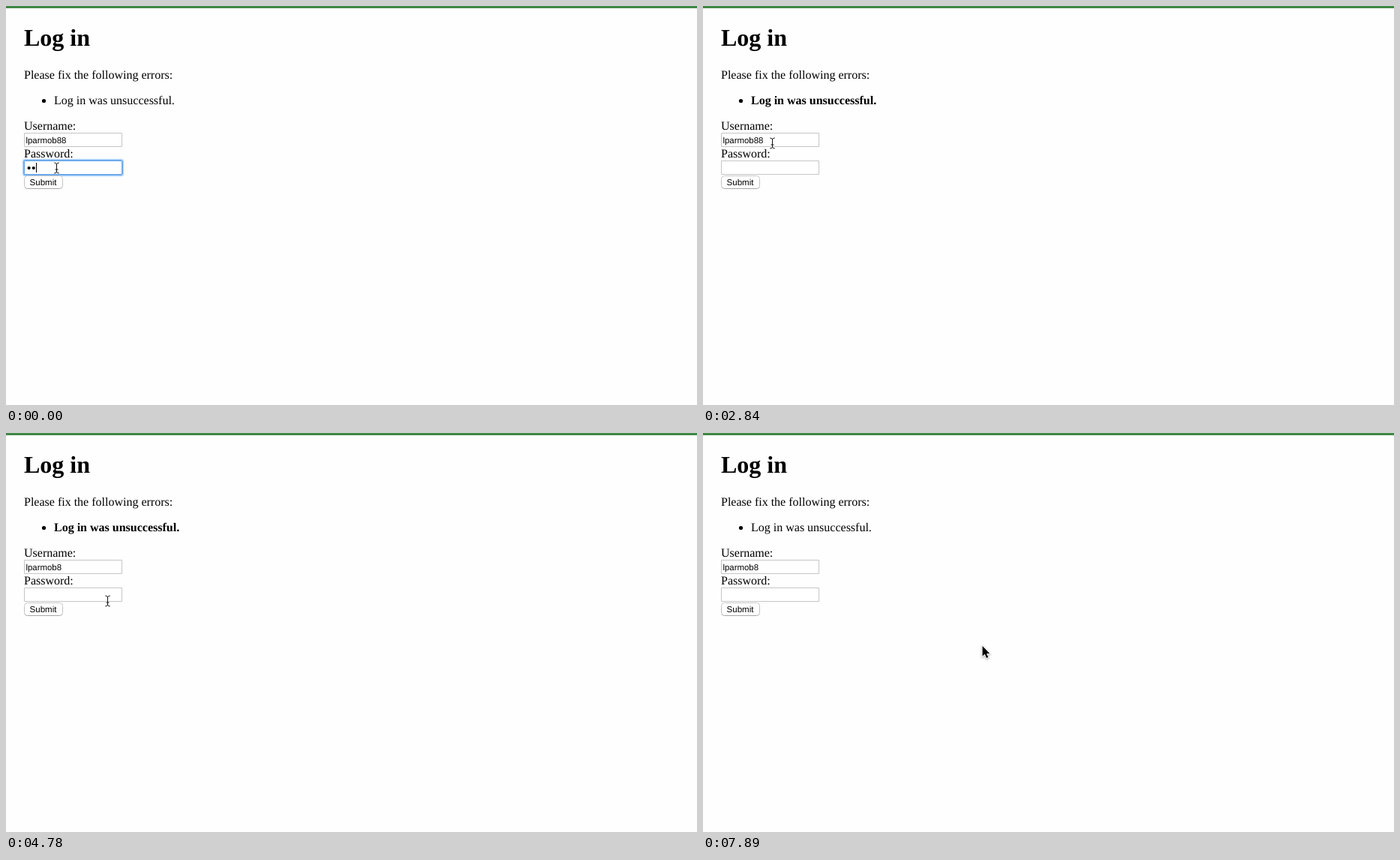
Write an HTML page with a canvas that moves like this. It is 921 px wide and 532 px high and loops after 8000 ms.

```html
<!DOCTYPE html>
<html lang="en">
<head>
<meta charset="utf-8">
<title>Log in</title>
<style>
  html, body { margin: 0; width: 100%; height: 100%; overflow: hidden; background: #fefefe; }
  canvas { display: block; }
</style>
</head>
<body>
<canvas id="stage" width="921" height="532"></canvas>
<script>
const ctx = document.getElementById('stage').getContext('2d');
const LOOP = 8000;
const SERIF = '"Liberation Serif", "Times New Roman", serif';
const SANS = '"Liberation Sans", Arial, sans-serif';
const USER = 'lparmob88';
const FIELD = { x: 24, w: 131, h: 19, user: 169, pass: 206 };

// Each step changes part of the state at its time.
const steps = [
  [0, { dots: 2, user: USER, focus: 'pass', caret: true, bold: false, popup: false, cursor: 'beam', x: 67.5, y: 216 }],
  [140, { dots: 3 }],
  ...typing(440, 150, 4),
  [1640, { caret: false }],
  [1790, { dots: 0, focus: '', bold: true }],
  [2540, { x: 78.5, y: 195 }],
  [2690, { x: 91.5, y: 160 }],
  [2840, { x: 92.5, y: 183 }],
  [2990, { focus: 'user', caret: true }],
  [3280, { user: USER.slice(0, -1) }],
  [3430, { popup: true }],
  [3730, { cursor: 'arrow', x: 176, y: 205 }],
  [3880, { x: 206, y: 212 }],
  [4030, { x: 216, y: 212 }],
  [4180, { popup: false, focus: '' }],
  [4330, { x: 143, y: 227 }],
  [4630, { x: 138, y: 226 }],
  [4780, { cursor: 'beam', x: 135.5, y: 224 }],
  [4930, { focus: 'pass', y: 221 }],
  [5380, { caret: false }],
  [5530, { caret: true, dots: 1 }],
  [5670, { dots: 2 }],
  [5820, { dots: 3 }],
  ...typing(6120, 145, 4),
  [7300, { dots: 0, focus: '', bold: false }],
  [7890, { cursor: 'arrow', x: 372.5, y: 284 }]
];

function typing(start, gap, first) {
  return Array.from({ length: 5 }, (_, i) => [start + i * gap, { dots: first + i }]);
}

function stateAt(t) {
  return Object.assign({}, ...steps.filter(s => s[0] <= t).map(s => s[1]));
}

function text(str, x, y, font, color = '#000') {
  ctx.font = font;
  ctx.fillStyle = color;
  ctx.fillText(str, x, y);
}

function dot(x, y, r) {
  ctx.fillStyle = '#000';
  ctx.beginPath();
  ctx.arc(x, y, r, 0, Math.PI * 2);
  ctx.fill();
}

function box(x, y, w, h, r) {
  ctx.beginPath();
  ctx.roundRect(x, y, w, h, r);
}

function field(y, focused) {
  const { x, w, h } = FIELD;
  ctx.fillStyle = '#fff';
  ctx.fillRect(x, y, w, h);
  ctx.lineWidth = 1;
  const rings = focused
    ? [[2.5, '#eef6fe'], [1.5, '#b9d8f9'], [0.5, '#74aff0'], [-0.5, '#66a5e8']]
    : [[-0.5, '#c6c6c6']];
  for (const [d, color] of rings) {
    ctx.strokeStyle = color;
    box(x - d, y - d, w + 2 * d, h + 2 * d, Math.max(0, d + 0.5));
    ctx.stroke();
  }
}

function caret(x, y) {
  ctx.fillStyle = '#000';
  ctx.fillRect(Math.floor(x), y + 3, 1, 13);
}

function button() {
  ctx.lineWidth = 1;
  box(24.5, 226.5, 51, 17, 4);
  ctx.fillStyle = '#fff';
  ctx.fill();
  const edge = ctx.createLinearGradient(0, 226, 0, 244);
  edge.addColorStop(0, '#c9c9c9');
  edge.addColorStop(0.8, '#c0c0c0');
  edge.addColorStop(1, '#a2a2a2');
  ctx.strokeStyle = edge;
  ctx.stroke();
  text('Submit', 31.6, 239, `11.5px ${SANS}`);
}

function popup() {
  ctx.save();
  ctx.shadowColor = 'rgba(0,0,0,0.4)';
  ctx.shadowBlur = 3;
  ctx.shadowOffsetY = 1;
  ctx.fillStyle = '#fff';
  box(24, 190, 131.5, 51, [0, 0, 3, 3]);
  ctx.fill();
  ctx.restore();
  text(USER, 36, 220, `13.5px ${SANS}`, '#1c1c1c');
}

function beam(x, y) {
  ctx.save();
  ctx.translate(x, y);
  ctx.lineCap = 'round';
  ctx.beginPath();
  ctx.moveTo(-2.8, -7);
  ctx.quadraticCurveTo(-0.2, -7, 0, -5);
  ctx.quadraticCurveTo(0.2, -7, 2.8, -7);
  ctx.moveTo(0, -5);
  ctx.lineTo(0, 5);
  ctx.moveTo(-2.8, 7);
  ctx.quadraticCurveTo(-0.2, 7, 0, 5);
  ctx.quadraticCurveTo(0.2, 7, 2.8, 7);
  ctx.moveTo(-1.6, 2);
  ctx.lineTo(1.6, 2);
  for (const [w, color] of [[2.2, 'rgba(255,255,255,0.7)'], [1, '#111']]) {
    ctx.lineWidth = w;
    ctx.strokeStyle = color;
    ctx.stroke();
  }
  ctx.restore();
}

function arrow(x, y) {
  const shape = new Path2D('M0 0V13.6L3.1 10.7L5.4 16L7.7 15L5.4 9.9H9.6Z');
  ctx.save();
  ctx.translate(x, y);
  ctx.shadowColor = 'rgba(0,0,0,0.4)';
  ctx.shadowBlur = 2.5;
  ctx.shadowOffsetY = 1;
  ctx.lineWidth = 1.8;
  ctx.strokeStyle = '#fff';
  ctx.stroke(shape);
  ctx.shadowColor = 'transparent';
  ctx.fillStyle = '#000';
  ctx.fill(shape);
  ctx.restore();
}

function draw(s) {
  ctx.textRendering = 'geometricPrecision';
  ctx.fillStyle = '#fefefe';
  ctx.fillRect(0, 0, 921, 532);
  ctx.fillStyle = '#3f8845';
  ctx.fillRect(0, 0, 921, 3);

  text('Log in', 24, 53, `bold 32px ${SERIF}`);
  text('Please fix the following errors:', 24, 97, `16px ${SERIF}`);
  dot(50.5, 126.5, 2.6);
  text('Log in was unsuccessful.', 64, 131, `${s.bold ? 'bold ' : ''}16px ${SERIF}`);
  text('Username:', 24, 165, `16px ${SERIF}`);
  text('Password:', 24, 202, `16px ${SERIF}`);

  field(FIELD.user, s.focus === 'user');
  field(FIELD.pass, s.focus === 'pass');
  button();

  text(s.user, 26.5, 183, `11.4px ${SANS}`);
  const userEnd = 26.5 + ctx.measureText(s.user).width;
  for (let i = 0; i < s.dots; i++) dot(30.6 + i * 6.15, 216, 2.1);
  if (s.caret && s.focus === 'user') caret(userEnd, FIELD.user);
  if (s.caret && s.focus === 'pass') caret(28 + s.dots * 6.15, FIELD.pass);

  if (s.popup) popup();
  (s.cursor === 'beam' ? beam : arrow)(s.x, s.y);
}

const start = performance.now();
function tick() {
  draw(stateAt((performance.now() - start) % LOOP));
  requestAnimationFrame(tick);
}
tick();
</script>
</body>
</html>
```
